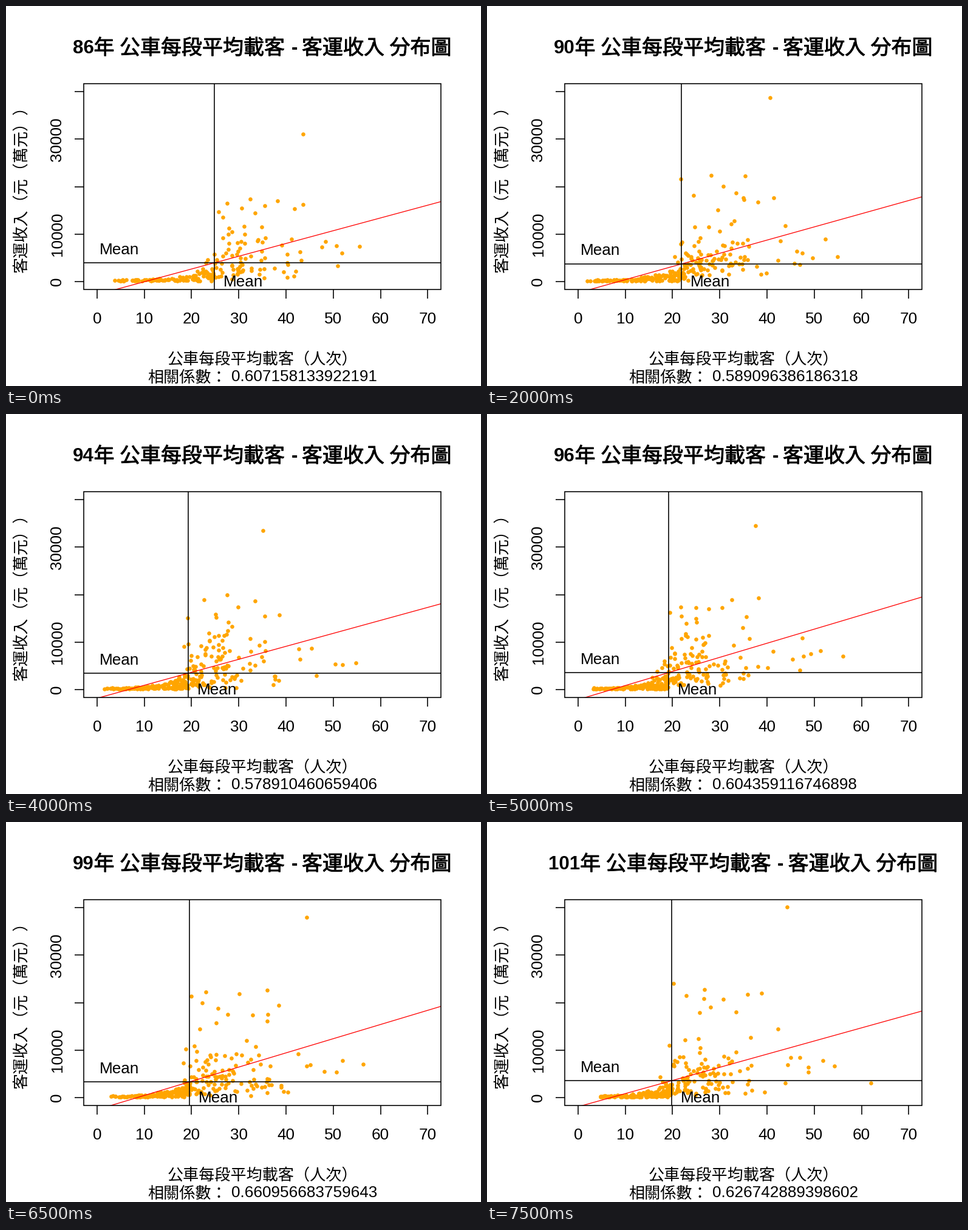
Recreate the animation shown at these times as a matplotlib script. Size 782x626 px, loop 8000 ms.

```python
import numpy as np
import matplotlib.pyplot as plt
from matplotlib.animation import FuncAnimation
from matplotlib.patches import Rectangle
from matplotlib.patheffects import withStroke

W, H, DPI = 782, 626, 64
PX = 72 / DPI  # points per pixel
LEFT, RIGHT, TOP, BOTTOM = 128, 716, 128, 467
LATIN, CJK = "Liberation Sans", "Noto Sans CJK JP"
BODY, TITLE, TITLE_CJK = 26.1, 31.2, 34
FIRST, COUNT = 86, 16

# Key years; the years between are interpolated
YEARS = [86, 88, 90, 92, 96, 99, 101]
MEAN_X = [24.87, 20.9, 21.9, 19.4, 19.15, 19.6, 19.85]
MEAN_Y = [3.96, 3.57, 3.71, 3.32, 3.57, 3.32, 3.57]  # thousands
SLOPE = [0.269, 0.297, 0.278, 0.25, 0.297, 0.299, 0.277]
PEAK_X = [43.6, 49.7, 40.7, 32.7, 37.5, 44.4, 44.2]
PEAK_Y = [31.1, 37.4, 38.8, 32.5, 34.5, 38, 40.2]
CORR = [0.607158133922191, 0.667937527081604, 0.589096386186318,
        0.553461804571914, 0.604359116746898, 0.660956683759643,
        0.626742889398602]


def sx(x):
    return 149.8 + 7.78 * x


def sy(y):
    return 454 - 7.82 * y


def at(year, values):
    return np.interp(year, YEARS, values)


def cloud(year):
    """Routes of one year: quiet, busy, leading and long-haul, plus the peak."""
    rng = np.random.default_rng(year)
    mean, peak = at(year, MEAN_X), at(year, PEAK_Y)
    n = int(275 - 90 * np.exp((FIRST - year) / 2))
    low = int(n * 0.54)
    high = n - low

    start = rng.uniform(0.7, 4)
    x1 = start + (mean - start) * rng.random(low) ** 0.75
    lift = 2.8 * (x1 / mean) ** 3 * rng.random(low) ** 1.8
    y1 = 0.08 + 0.25 * rng.random(low) + lift

    x2 = mean - 4 + rng.gamma(2.6, 3.9, high)
    near = np.clip((x2 - mean + 8) / 12, 0.35, 1)
    y2 = 0.2 + rng.gamma(2, 2.6, high) * near

    x3 = mean + np.linspace(0.4, 19, 8) + rng.uniform(-0.6, 0.6, 8)
    y3 = peak * rng.uniform(0.43, 0.6, 8)
    x4 = np.linspace(44, 55, 5) + rng.uniform(-1.5, 1.5, 5)
    y4 = rng.uniform(5, 9, 5)
    return (np.concatenate([x1, x2, x3, x4, [at(year, PEAK_X)]]),
            np.concatenate([y1, y2, y3, y4, [peak]]))


fig = plt.figure(figsize=(W / DPI, H / DPI), dpi=DPI, facecolor="white")
ax = fig.add_axes([0, 0, 1, 1])
ax.set_xlim(0, W)
ax.set_ylim(H, 0)
ax.axis("off")


def label(x, y, text, size=BODY, font=LATIN, ha="left", **kw):
    return ax.text(x, y, text, fontsize=size * PX, family=font, ha=ha,
                   va="baseline", rotation_mode="anchor", zorder=6, **kw)


def heading(text):
    thick = withStroke(linewidth=0.9 * PX, foreground="black")
    return label(0, 79.5, text, TITLE_CJK, CJK, path_effects=[thick])


def line(xs, ys, color="black", width=1.6, z=4):
    return ax.plot(xs, ys, color=color, lw=width * PX, zorder=z,
                   solid_capstyle="butt")[0]


box = ax.add_patch(Rectangle((LEFT, TOP), RIGHT - LEFT, BOTTOM - TOP,
                             fill=False, lw=1.6 * PX, zorder=5))
for v in range(0, 80, 10):
    line([sx(v)] * 2, [BOTTOM, BOTTOM + 15])
    label(sx(v), 523, str(v), ha="center")
for v in range(0, 50, 10):
    line([LEFT - 15, LEFT], [sy(v)] * 2)
for v in (0, 10, 30):
    label(91.5, sy(v), str(v * 1000), ha="center", rotation=90)

label(422, 589.5, "公車每段平均載客（人次）", font=CJK, ha="center")
label(33, 296, "客運收入（元（萬元））", font=CJK, ha="center", rotation=90)
label(233, 620, "相關係數：", font=CJK)
corr = label(370.5, 618, "")

year_text = label(0, 77.5, "", TITLE, ha="right", weight="bold")
title = [(144.5, heading("年")),
         (187, heading("公車每段平均載客")),
         (469.5, label(0, 77.5, "-", TITLE, weight="bold")),
         (487, heading("客運收入")),
         (631.5, heading("分布圖"))]

dots, = ax.plot([], [], "o", color="orange", ms=6.6 * PX, mew=0, zorder=2)
fit = line([], [], "red", 1.3, 3)
fit.set_clip_path(box)
mean_v = line([], [])
mean_h = line([], [])
text_h = label(153.5, 0, "Mean")
text_v = label(0, 462, "Mean")


def draw(i):
    year = FIRST + i
    mx, my, slope = (at(year, t) for t in (MEAN_X, MEAN_Y, SLOPE))
    px, py = sx(mx), sy(my)

    x, y = cloud(year)
    dots.set_data(sx(x), sy(y))
    ends = np.array([-2.8, 72.8])
    fit.set_data(sx(ends), sy(my + slope * (ends - mx)))
    mean_v.set_data([px, px], [TOP, BOTTOM])
    mean_h.set_data([LEFT, RIGHT], [py, py])
    text_h.set_y(py - 14.5)
    text_v.set_x(px + 15)
    corr.set_text(f"{at(year, CORR):.15f}")

    # The title stays centred when the year gains a digit
    shift = 0.278 * TITLE * (len(str(year)) - 2)
    year_text.set_text(str(year))
    year_text.set_x(144.5 + shift)
    for x0, part in title:
        part.set_x(x0 + shift)
    return []


anim = FuncAnimation(fig, draw, frames=COUNT, interval=500, repeat=True,
                     repeat_delay=0, init_func=lambda: draw(0))
plt.show()
```
